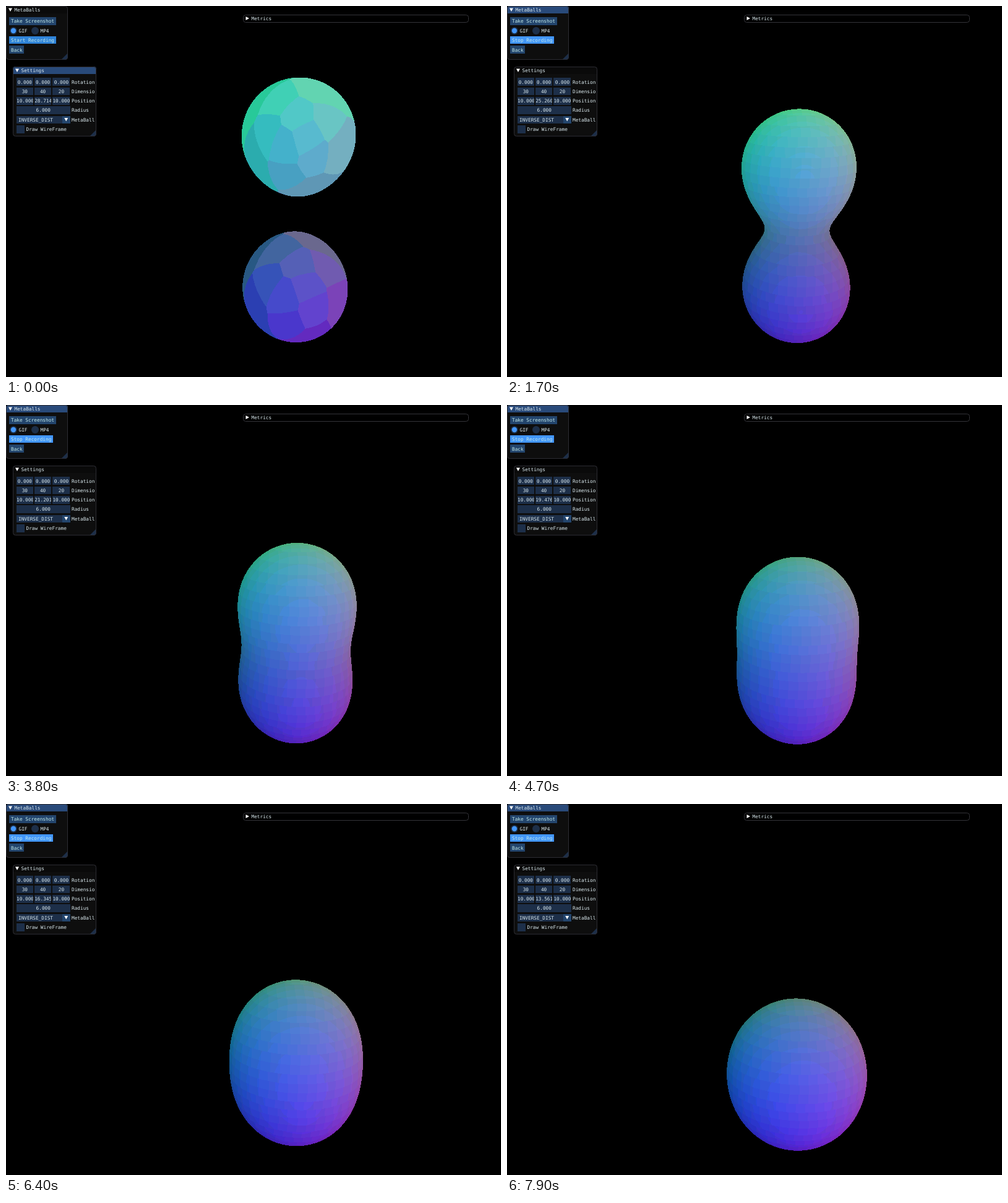
Recreate the animation shown at these times as an HTML page with a canvas. Size 800 by 600 pixels, loop 8000 ms.

```html
<!DOCTYPE html>
<html lang="en">
<head>
<meta charset="utf-8">
<title>MetaBalls</title>
<style>
html, body { margin: 0; width: 100%; height: 100%; overflow: hidden; background: #000; }
canvas { display: block; }
</style>
</head>
<body>
<canvas id="stage" width="800" height="600"></canvas>
<script>
const ctx = document.getElementById('stage').getContext('2d');
const LOOP = 8000, STEP = 100;

// Height of the moving ball: [time in ms, y]
const PATH = [[0, 28.714], [600, 27.439], [1700, 25.26], [2900, 22.926],
  [4700, 19.476], [6400, 16.345], [7900, 13.561]];

function ballHeight(t) {
  const i = Math.max(1, PATH.findIndex(k => k[0] >= t));
  const [t0, y0] = PATH[i - 1], [t1, y1] = PATH[i];
  return y0 + (y1 - y0) * (t - t0) / (t1 - t0);
}

// Scene: two balls in a 30 x 40 x 20 box, coloured by position
const RADIUS = 6, CENTER = 10, REST_Y = 10;
const EYE = { x: 5, y: 34.05, z: 60.4 };
const FOCAL = 300 / Math.tan(Math.PI / 8);
const PITCH = 13.29 * Math.PI / 180;
const SIN = Math.sin(PITCH), COS = Math.cos(PITCH);
const VIEW = { x: 345, y: 100, w: 250, h: 470 };
const image = ctx.createImageData(VIEW.w, VIEW.h);

// Point hit by the ray through a pixel; the field sums inverse squared distances
function trace(px, py, ballY) {
  const vx = (px - 399.5) / FOCAL, vy = (299.5 - py) / FOCAL;
  const len = Math.hypot(vx, vy, 1);
  const dx = vx / len, dy = (vy * COS - SIN) / len, dz = (-vy * SIN - COS) / len;
  for (let s = 36, n = 0; s < 72 && n < 70; n++) {
    const x = EYE.x + dx * s, y = EYE.y + dy * s, z = EYE.z + dz * s;
    const flat = (x - CENTER) ** 2 + (z - CENTER) ** 2;
    const sum = 1 / (flat + (y - ballY) ** 2) + 1 / (flat + (y - REST_Y) ** 2);
    const gap = 1 / Math.sqrt(sum) - RADIUS;
    if (gap < 0.03) return [x, y, z];
    s += gap;
  }
  return null;
}

const toColor = ([x, y, z]) => [x * 8.5, y * 6.375, z * 12.75];

// Fine look: small cells, each row shifted by a pseudo-random amount
function fineColor([x, y, z]) {
  const row = Math.floor(y), shift = Math.sin(row * row * 7.3) / 2;
  return toColor([Math.floor(x + shift) + 0.5 - shift, row + 0.5, Math.floor(z - shift) + 0.5 + shift]);
}

// Coarse look: the nearest of a few colours picked along a spiral on each ball
function coarsePicker(ballY) {
  const count = 13, palette = [];
  for (const mid of [212, 454]) {
    for (let k = 0; k < count; k++) {
      const r = 88 * Math.sqrt((k + 0.5) / count), a = k * 2.4;
      const hit = trace(470 + r * Math.cos(a), mid + r * Math.sin(a), ballY);
      if (hit) palette.push(toColor(hit));
    }
  }
  return hit => {
    const c = toColor(hit);
    const far = p => Math.hypot(p[0] - c[0], p[1] - c[1], p[2] - c[2]);
    return palette.reduce((best, p) => far(p) < far(best) ? p : best);
  };
}

function drawBalls(ballY, coarse) {
  const pick = coarse ? coarsePicker(ballY) : fineColor;
  image.data.fill(0);
  for (let j = 0, k = 0; j < VIEW.h; j++) {
    for (let i = 0; i < VIEW.w; i++, k += 4) {
      const hit = trace(VIEW.x + i, VIEW.y + j, ballY);
      if (hit) image.data.set([...pick(hit), 255], k);
    }
  }
  ctx.putImageData(image, VIEW.x, VIEW.y);
}

// Panels
const FIELD = '#1d2f49', BUTTON = '#23456d', TITLE = '#294a7a', IDLE = '#0a0a0a', TEXT = '#dcebf0';
const CHAR = 14 / 3;

// Filled box with its edges on whole pixels
function box(x, y, w, h, fill, round = 0) {
  const left = Math.round(x), top = Math.round(y);
  ctx.beginPath();
  ctx.roundRect(left, top, Math.round(x + w) - left, Math.round(y + h) - top, round);
  ctx.fillStyle = fill;
  ctx.fill();
}

function outline(x, y, w, h, color) {
  ctx.beginPath();
  ctx.roundRect(x + 0.5, y + 0.5, w - 1, h - 1, 4);
  ctx.strokeStyle = color;
  ctx.stroke();
}

function poly(fill, ...p) {
  ctx.beginPath();
  for (let i = 0; i < p.length; i += 2) ctx.lineTo(p[i], p[i + 1]);
  ctx.fillStyle = fill;
  ctx.fill();
}

function disc(x, y, r, fill) {
  ctx.beginPath();
  ctx.arc(x, y, r, 0, 7);
  ctx.fillStyle = fill;
  ctx.fill();
}

function text(s, x, mid, color = TEXT) {
  ctx.fillStyle = color;
  ctx.fillText(s, x, mid + 2.9);
}

const arrowDown = (x, y) => poly('#fff', x - 3, y - 2.5, x + 3, y - 2.5, x, y + 3);

function panel(x, y, w, h, title, bar) {
  box(x, y, w, h, '#0e0e0e', 4);
  box(x, y, w, 12, bar, [4, 4, 0, 0]);
  poly(FIELD, x + w, y + h - 11, x + w, y + h - 3, x + w - 3, y + h, x + w - 11, y + h);
  outline(x, y, w, h, '#2c2c33');
  arrowDown(x + 7, y + 6);
  text(title, x + 13.5, y + 6.3);
}

function button(s, mid, fill) {
  box(5, mid - 6.3, s.length * CHAR + 5.6, 12.6, fill);
  text(s, 8, mid, '#c4ebe8');
}

function radio(s, x, on) {
  disc(x, 40, 6, FIELD);
  if (on) disc(x, 40, 4.2, '#4296fa');
  text(s, x + 8.5, 40);
}

function field(s, x, mid, w) {
  box(x, mid - 6.3, w, 12.6, FIELD);
  ctx.save();
  ctx.beginPath();
  ctx.rect(x, mid - 7, w, 14);
  ctx.clip();
  text(s, x + Math.max(0, (w - s.length * CHAR) / 2), mid);
  ctx.restore();
}

function drawPanels(ballY, first) {
  ctx.font = '7.75px "DejaVu Sans Mono", monospace';
  ctx.lineWidth = 1;

  panel(0, 0, 100, 87, 'MetaBalls', first ? IDLE : TITLE);
  button('Take Screenshot', 24.5, BUTTON);
  radio('GIF', 12, true);
  radio('MP4', 47, false);
  if (first) button('Start Recording', 55, '#2f83d8');
  else button('Stop Recording', 55, '#4296fa');
  button('Back', 70.7, BUTTON);

  panel(11, 98, 135, 113, 'Settings', first ? TITLE : IDLE);
  const row = r => 122.6 + r * 15.33;
  const triples = [
    ['Rotation', '0.000', '0.000', '0.000'],
    ['Dimensio', '30', '40', '20'],
    ['Position', '10.000', ballY.toFixed(3), '10.000']
  ];
  triples.forEach(([name, ...values], r) => {
    values.forEach((v, c) => field(v, 17 + c * 29.2, row(r), c < 2 ? 26.7 : 28));
    text(name, 106, row(r));
  });
  field('6.000', 17, row(3), 86.5);
  text('Radius', 106, row(3));
  box(17, row(4) - 6.3, 74, 12.6, FIELD);
  box(91, row(4) - 6.3, 12.5, 12.6, BUTTON);
  text('INVERSE_DIST', 20, row(4));
  arrowDown(97.2, row(4) - 0.3);
  text('MetaBall', 106, row(4));
  box(17, row(5) - 6.3, 12.6, 12.6, FIELD);
  text('Draw WireFrame', 32.5, row(5));

  outline(383, 14, 365, 13, '#333338');
  poly('#fff', 387.5, 17, 387.5, 23, 393, 20);
  text('Metrics', 396.5, 20.5);
}

let shown = -1;
function frame(now) {
  const t = Math.floor(now % LOOP / STEP) * STEP;
  if (t !== shown) {
    shown = t;
    const y = ballHeight(t), first = t === 0;
    ctx.fillStyle = '#000';
    ctx.fillRect(0, 0, 800, 600);
    drawBalls(y, first);
    drawPanels(y, first);
  }
  requestAnimationFrame(frame);
}
frame(performance.now());
</script>
</body>
</html>
```
